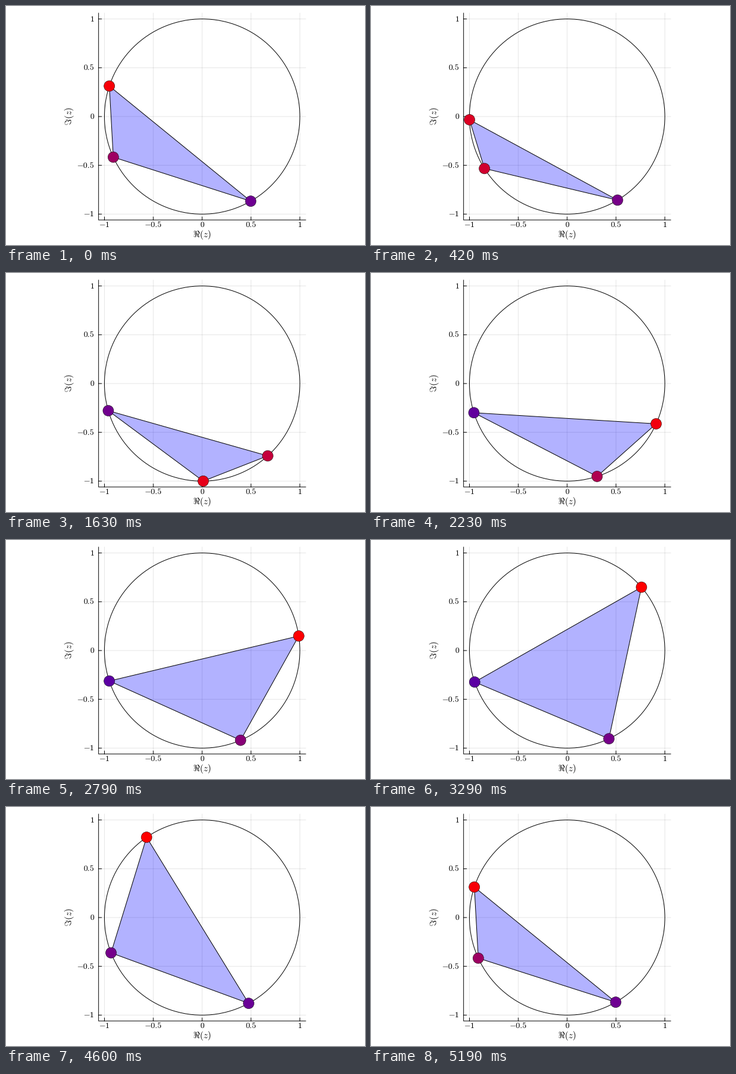
Write a matplotlib script that moves like this. It is 600 px wide and 400 px high and loops after 5.21 s.

```python
import numpy as np
import matplotlib.pyplot as plt
from matplotlib.animation import FuncAnimation
from matplotlib.patches import Circle, Polygon

plt.rcParams["mathtext.fontset"] = "cm"

STEPS, LOOP, TICK = 250, 5210, 10    # poses per loop, loop and clock in ms
PT = 0.72                            # points per pixel at 100 dpi
CX, CY, R = 327.8, 185.0, 163.3
HALF = 1.06 * R
LEFT, RIGHT, TOP, BOTTOM = CX - HALF, CX + HALF, CY - HALF, CY + HALF

# The vertices solve B(z) = lam for B(z) = z (z-a)(z-b) / ((1-a'z)(1-b'z)).
SUM, PROD = -0.4715 - 1.135j, -0.658 + 0.6217j
ZEROS = np.roots([1, -SUM, PROD])
START = np.radians(306.2)


def px(z):
    return np.column_stack([CX + R * z.real, CY - R * z.imag])


def vertices(step):
    lam = np.exp(1j * (START + 2 * np.pi * step / (STEPS - 1)))
    z = np.roots([1, -(SUM + lam * np.conj(PROD)),
                  PROD + lam * np.conj(SUM), -lam])
    return z / abs(z)


def speed(z):
    return 1 / (1 + sum((1 - abs(a) ** 2) / abs(z - a) ** 2 for a in ZEROS))


def heat(v):
    c = min(1, 1.02 * v ** 0.26)
    return c, 0, 1 - c


fig = plt.figure(figsize=(6, 4), dpi=100, facecolor="white")
ax = fig.add_axes([0, 0, 1, 1])
ax.set(xlim=(0, 600), ylim=(400, 0))
ax.axis("off")


def line(xs, ys, **kw):
    ax.plot(xs, ys, color="black", lw=PT, snap=False, **kw)


def label(x, y, s, size, ha="center", **kw):
    ax.text(x, y, f"${s}$", size=size * PT, ha=ha, va="center", **kw)


for t in (-1, -0.5, 0, 0.5, 1):
    x, y = CX + R * t, CY - R * t
    line([x, x], [TOP, BOTTOM], alpha=0.1, zorder=1)
    line([LEFT, RIGHT], [y, y], alpha=0.1, zorder=1)
    line([x, x], [BOTTOM, BOTTOM - 5], zorder=2)
    line([LEFT, LEFT + 5], [y, y], zorder=2)
    label(x, 366.5, f"{t:g}", 13.8)
    label(147.9, y, f"{t:g}", 13.8, ha="right")
line([LEFT, LEFT, RIGHT], [TOP, BOTTOM, BOTTOM], zorder=2)
label(CX, 383.3, r"\Re(z)", 15.4)
label(106, CY, r"\Im(z)", 15.4, rotation=90)

ax.add_patch(Circle((CX, CY), R, fill=False, ec="black", lw=PT, zorder=3))
tri = ax.add_patch(Polygon(px(vertices(0)), fc=(0, 0, 1, 0.3), ec="black",
                           lw=PT, joinstyle="round", zorder=4))
dots = [ax.add_patch(Circle((0, 0), 9, ec="black", lw=0.5 * PT, zorder=5))
        for _ in range(3)]


def update(i):
    # Each pose starts on the clock tick nearest to its ideal time.
    step = int((i + 0.5) * TICK * STEPS / LOOP)
    z = vertices(step)
    pts = px(z)
    tri.set_xy(pts)
    for dot, p, v in zip(dots, pts, speed(z)):
        dot.center = p
        dot.set_facecolor(heat(v))
    return [tri, *dots]


anim = FuncAnimation(fig, update, frames=LOOP // TICK, interval=TICK,
                     repeat=True, repeat_delay=0)
plt.show()
```
